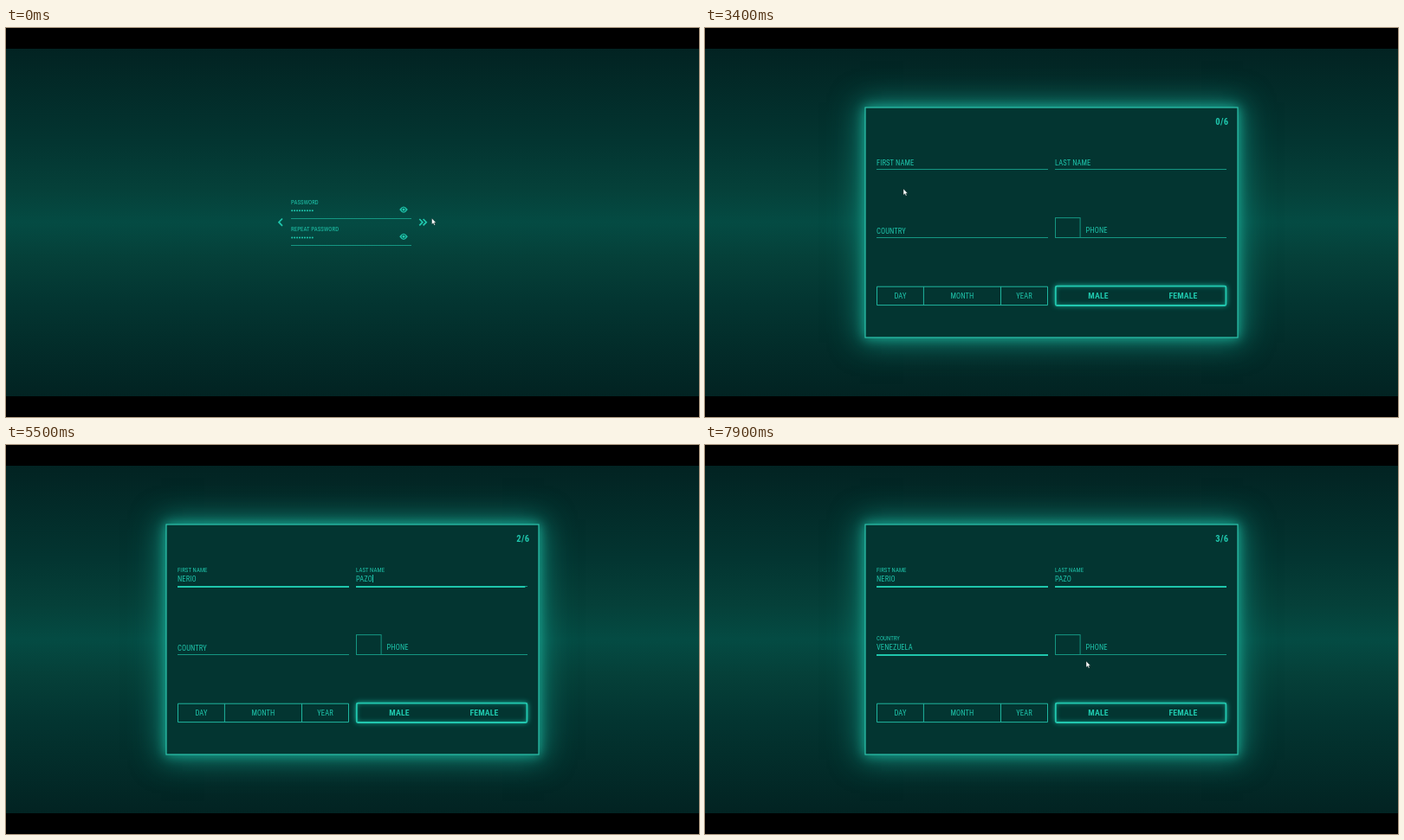
Recreate the animation shown at these times as an HTML page. Size 800x450 px, loop 8000 ms.

```html
<!DOCTYPE html>
<html lang="en">
<head>
<meta charset="utf-8">
<title>Sign-up form</title>
<style>
  html, body { margin: 0; width: 100%; height: 100%; overflow: hidden; background: #000; }
  #stage {
    --ink: #1fc6ac; --dim: #159682;
    position: relative; width: 800px; height: 450px; overflow: hidden; color: var(--ink);
    font: 400 8.5px/10px "Roboto Condensed", Roboto, sans-serif; font-stretch: 75%; letter-spacing: .1px;
  }
  #stage * { position: absolute; box-sizing: border-box; white-space: pre; }
  #back {
    left: 0; top: 24px; width: 800px; height: 402px;
    background: linear-gradient(#022322, #033531 27%, #054039 40%, #044b43 50%, #054039 60%, #033531 73%, #022322);
  }
  #login, #card { inset: 0; }
  #panel {
    left: 185px; top: 92px; width: 430px; height: 266px; background: #033531;
    box-shadow: 0 0 12px 1px #1aa590, 0 0 32px 6px #14907fcc;
  }
  #gender {
    left: 404px; top: 298px; width: 198px; height: 23px; border-radius: 2px;
    box-shadow: 0 0 6px #1bb39d, inset 0 0 6px #159e8b;
  }
  .rule { height: 1px; background: var(--dim); }
  .fill { height: 1.6px; background: var(--ink); transform-origin: 0 0; }
  .small { font-size: 6.8px; }
  .label { transform-origin: 0 50%; }
  .bold { font-size: 9.8px; font-weight: 700; }
  .mid { transform: translateX(-50%); }
  .caret { width: .8px; height: 9px; background: var(--ink); }
  svg { inset: 0; overflow: visible; }
</style>
</head>
<body>
<div id="stage">
  <div id="back"></div>
  <div id="login">
    <svg width="800" height="450" fill="none" stroke="#1fc6ac" stroke-width="1.7">
      <path d="M319 220.5l-4 4.2 4 4.2M477.3 221l3.6 3.7-3.6 3.7M481.6 221l3.6 3.7-3.6 3.7"/>
      <g id="secrets"></g>
    </svg>
  </div>
  <div id="card">
    <div id="panel"></div>
    <div id="gender"></div>
    <svg width="800" height="450" fill="none" stroke="#1fb59f">
      <rect x="185" y="92" width="430" height="266" stroke="#2cc3ac" stroke-width="1.2"/>
      <rect x="404.8" y="298.6" width="196.6" height="22.4" rx="1.5" stroke="#22c8af" stroke-width="1.8"/>
      <path d="M198.5 299.2H395.5V320.6H198.5ZM252.4 299.2V320.6M341.5 299.2V320.6"/>
      <rect x="404.5" y="219.6" width="28.6" height="22.9" stroke="#159682"/>
    </svg>
  </div>
  <svg width="800" height="450">
    <path id="mouse" d="M0 0V7.2L1.7 5.7 2.9 8.3 4 7.8 2.9 5.3H5Z" fill="#fff" stroke="#02201e" stroke-width=".4"/>
  </svg>
</div>
<script>
const LOOP = 8000, STEP = 100;
const $ = id => document.getElementById(id);
const login = $('login'), card = $('card'), mouse = $('mouse');

function add(parent, cls, x, y, w) {
  const el = document.createElement('div');
  el.className = cls;
  el.style.left = x + 'px';
  el.style.top = y + 'px';
  if (w) el.style.width = w + 'px';
  parent.append(el);
  return el;
}
function text(parent, str, x, midY, cls = '') {
  const el = add(parent, cls, x, midY - 5);
  el.textContent = str;
  return el;
}

// Password step: label, nine dots, line and eye
[['PASSWORD', 201.5], ['REPEAT PASSWORD', 232.7]].forEach(([name, y]) => {
  text(login, name, 329, y, 'small');
  add(login, 'rule', 329, y + 18.3, 139);
  $('secrets').innerHTML += `<path d="M330.2 ${y + 9.8}h23.7" stroke-width="2.1" stroke-linecap="round" stroke-dasharray="0 2.95"/>
    <g transform="translate(459 ${y + 8.6})">
      <path d="M-4.8 0Q0-7.2 4.8 0 0 7.2-4.8 0Z" fill="#1fc6ac" stroke="none"/>
      <circle r="2" stroke="#04463f" stroke-width=".9"/>
    </g>`;
});

// Personal data card
const counter = text(card, '0/6', 589.3, 109.4, 'bold');
counter.style.fontSize = '10.6px';
counter.style.letterSpacing = '.3px';
text(card, 'PHONE', 439.5, 234);
add(card, 'rule', 433, 242, 169);
[['DAY', 225.5], ['MONTH', 297], ['YEAR', 368.5]].forEach(([s, x]) => text(card, s, x, 309.7, 'mid'));
[['MALE', 454], ['FEMALE', 552]].forEach(([s, x]) => text(card, s, x, 309.7, 'mid bold'));

// Each field: focus and blur times, key presses, moment it becomes valid
const fields = [
  { name: 'FIRST NAME', x: 198, y: 156, value: 'NERIO', keys: [4200, 4300, 4450, 4600, 4700], focus: 4000, blur: 4900, valid: 4300 },
  { name: 'LAST NAME', x: 404, y: 156, value: 'PAZO', keys: [5000, 5100, 5300, 5400], focus: 4900, blur: 5900, valid: 5075 },
  { name: 'COUNTRY', x: 198, y: 234.6, value: 'VENEZUELA', keys: [6100, 6200, 6300, 6500, 6600, 6700, 6800, 6900, 7100], focus: 5900, blur: 7600, valid: 7100 }
];
for (const f of fields) {
  const base = Math.round(f.y + 7);
  add(card, 'rule', f.x, base, 198);
  f.fill = add(card, 'fill', f.x, base, 198);
  f.label = text(card, f.name, f.x, f.y, 'label');
  f.input = text(card, '', f.x, f.y - 1);
  f.caret = add(card, 'caret', f.x, f.y - 5.6);
}

// time, x, y of the pointer
const path = [
  [0, 491.5, 220], [500, 491.5, 220], [1400, 342, 147], [1900, 298, 144], [2300, 275, 149], [2400, 269, 146],
  [2500, 269, 146], [3400, 229, 186], [3900, 230, 153], [6700, 230, 153], [7000, 300.3, 198], [7600, 440, 250], [8000, 440, 250]
];
const clamp = v => Math.min(1, Math.max(0, v));
const ramp = (t, from, len) => clamp((t - from) / len);

// CSS "ease": cubic-bezier(.25, .1, .25, 1)
function ease(x) {
  if (x <= 0 || x >= 1) return clamp(x);
  let lo = 0, hi = 1, u = x;
  for (let i = 0; i < 20; i++) {
    u = (lo + hi) / 2;
    const bx = .75 * u * (1 - u) + u ** 3;
    if (bx < x) lo = u; else hi = u;
  }
  return .3 * u * (1 - u) ** 2 + 3 * u * u * (1 - u) + u ** 3;
}

function pointer(t) {
  const i = Math.max(1, path.findIndex(p => p[0] > t));
  const [t0, x0, y0] = path[i - 1], [t1, x1, y1] = path[i];
  const k = (t - t0) / (t1 - t0);
  return [x0 + (x1 - x0) * k, y0 + (y1 - y0) * k];
}

function render(t) {
  login.style.opacity = 1 - ramp(t, 0, 400);
  card.style.opacity = ease(ramp(t, 2500, 500));
  mouse.setAttribute('transform', `translate(${pointer(t)})`);
  mouse.style.opacity = t >= 4200 && t < 6800 ? 0 : 1;
  counter.textContent = fields.filter(f => t >= f.valid).length + '/6';
  for (const f of fields) {
    const up = ease(ramp(t, f.focus, 200));
    const count = f.keys.filter(k => t >= k).length;
    const last = count ? f.keys[count - 1] : f.focus;
    f.label.style.transform = `translateY(${-11 * up}px) scale(${1 - .2 * up})`;
    f.input.textContent = f.value.slice(0, count);
    f.fill.style.transform = `scaleX(${ease(ramp(t, f.valid, 500))})`;
    f.caret.style.left = f.x + f.input.offsetWidth + .3 + 'px';
    f.caret.style.opacity = t >= f.focus && t < f.blur && (t - last) % 1000 < 500 ? 1 : 0;
  }
}

const start = performance.now();
function tick() {
  const t = (performance.now() - start) % LOOP;
  render(Math.floor(t / STEP) * STEP);
  requestAnimationFrame(tick);
}
render(0);
requestAnimationFrame(tick);
</script>
</body>
</html>
```
